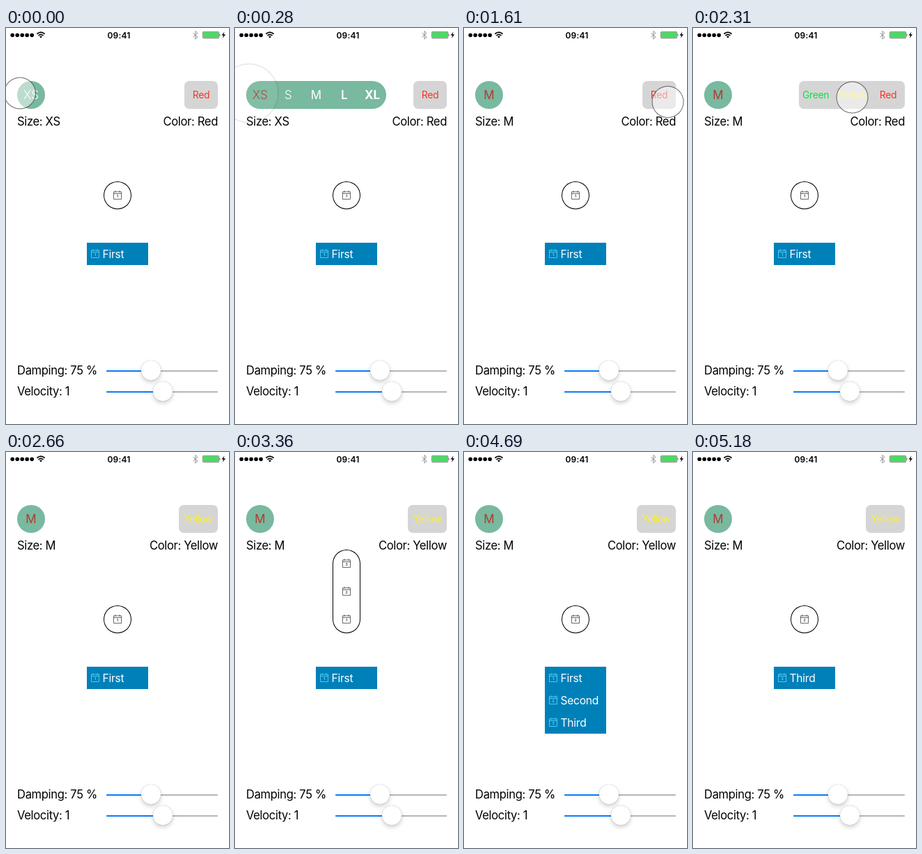
Recreate the animation shown at these times as an HTML page. Size 320 by 568 pixels, loop 5250 ms.

```html
<!DOCTYPE html>
<html lang="en">
<head>
<meta charset="utf-8">
<title>Expandable selectors</title>
<style>
html, body { margin: 0; width: 100%; height: 100%; overflow: hidden; background: #fff; }
body { position: relative; font-family: Inter, Roboto, sans-serif; color: #000; }
body > * { position: absolute; }
.label { font-size: 16.6px; letter-spacing: -.35px; line-height: 20px; white-space: pre; }
#clock { left: 112px; width: 100px; top: 0; text-align: center; font-size: 12px; font-weight: 600; line-height: 21px; letter-spacing: .2px; }
#status { left: 0; top: 0; }
.track { left: 144px; width: 160px; height: 2px; border-radius: 1px; }
.thumb { width: 28px; height: 28px; border-radius: 50%; background: #fff; box-shadow: 0 3px 6px rgba(0,0,0,.2), 0 0 1px rgba(0,0,0,.3); }
.menu { overflow: hidden; }
.cell { position: absolute; left: 0; top: 0; display: flex; align-items: center; justify-content: center; white-space: nowrap; }
.cell svg { display: block; }
#size { background: #78b99f; border-radius: 20px; font-size: 17px; }
#color { background: #d5d5d5; border-radius: 7px; font-size: 13.8px; letter-spacing: -.25px; }
#day { background: #fff; border-radius: 20px; box-shadow: inset 0 0 0 1px #000; color: #444; }
#rank { background: #0080b9; font-size: 15.6px; letter-spacing: -.25px; color: #fff; }
#rank .cell { justify-content: flex-start; }
#rank svg { margin: 0 3.5px 0 5px; color: #62dcff; }
#touch { left: -23px; top: -23px; width: 46px; height: 46px; box-sizing: border-box; border-radius: 50%; background: rgba(255,255,255,.5); border: 1px solid rgba(0,0,0,.58); }
</style>
</head>
<body>
<svg id="status" width="320" height="21">
  <g id="dots"></g>
  <path d="M44.4 8.5Q50 3.7 55.6 8.5M46.5 10.8Q50 7.9 53.5 10.8" fill="none" stroke="#000" stroke-width="1.7"/>
  <path d="M48 12.3Q50 10.8 52 12.3L50 14.5Z"/>
  <path d="M268.4 7.2L275 13L271.8 16V4.4L275 7.4L268.4 13.2" fill="none" stroke="#929292"/>
  <rect x="282.25" y="5.25" width="23.5" height="9.5" rx="1.8" fill="#fff" stroke="#333" stroke-width=".6"/>
  <rect x="283" y="6" width="22" height="8" rx="1" fill="#4cd964"/>
  <path d="M306.6 8.2Q308.4 10 306.6 11.8Z"/>
  <path d="M313.4 5.4L309.4 10.6H311.9L310.8 14.6L315 9.2H312.3Z"/>
</svg>
<div id="clock">09:41</div>
<div class="label" id="sizeLabel" style="left:16px;top:124px"></div>
<div class="label" id="colorLabel" style="right:16px;top:124px"></div>
<script>
const LOOP = 5250;
const $ = id => document.getElementById(id);

function add(parent, cls, css = '', html = '') {
  const el = document.createElement('div');
  el.className = cls;
  el.style.cssText = css;
  el.innerHTML = html;
  parent.append(el);
  return el;
}

const calendar = n => `<svg width="14" height="14" viewBox="0 0 14 14">
  <path d="M1.5 1.9H12.5V12.5H1.5ZM1.5 4.5H12.5M4 .3V2.9M10 .3V2.9" fill="none" stroke="currentColor" stroke-width=".8"/>
  <text x="7" y="10.4" font-size="5" font-weight="700" text-anchor="middle" letter-spacing="0" fill="currentColor">${n}</text></svg>`;

$('dots').innerHTML = [0, 1, 2, 3, 4]
  .map(i => `<circle cx="${9.2 + i * 7}" cy="10.3" r="2.8"/>`).join('');

function slider(text, y, x) {
  add(document.body, 'label', `left:16px;top:${y - 10}px`, text);
  add(document.body, 'track', `top:${y}px;background:#b6b6b6`);
  add(document.body, 'track', `top:${y}px;width:${x - 144}px;background:#0a7cf5`);
  add(document.body, 'thumb', `left:${x - 14}px;top:${y - 14}px`);
}
slider('Damping: 75 %', 491, 207.5);
slider('Velocity: 1', 521, 224.5);

// Cells hold their expanded place; home gives the collapsed place.
const menus = [
  {
    id: 'size', open: 50, close: 1060, from: 0, to: 2,
    cells: ['XS', 'S', 'M', 'L', 'XL'].map((html, i) => ({
      html, x: 16 + 40 * i, y: 76, w: 40, h: 40, weight: [300, 300, 400, 600, 700][i]
    })),
    home: () => [16, 76]
  },
  {
    id: 'color', open: 1700, close: 2365, from: 2, to: 1,
    cells: [['Green', 152, 48, '#00e640'], ['Yellow', 200, 56, '#fff21c'], ['Red', 256, 48, '#fa3323']]
      .map(([html, x, w, color]) => ({ html, x, y: 76, w, h: 40, color })),
    home: c => [304 - c.w, 76]
  },
  {
    id: 'day', open: 3065, close: 3625, from: 0, to: 1,
    cells: [1, 2, 3].map((n, i) => ({ html: calendar(n), x: 140, y: 220 - 40 * i, w: 40, h: 40 })),
    home: () => [140, 220]
  },
  {
    id: 'rank', open: 4370, close: 4870, from: 0, to: 2,
    cells: ['First', 'Second', 'Third'].map((name, i) => ({
      html: calendar(i + 1) + `<span>${name}</span>`, x: 116, y: 308 + 32 * i, w: 88, h: 32
    })),
    home: () => [116, 308]
  }
];

for (const m of menus) {
  m.el = add(document.body, 'menu');
  m.el.id = m.id;
  for (const c of m.cells) {
    c.el = add(m.el, 'cell', `width:${c.w}px;height:${c.h}px;font-weight:${c.weight || 400}`, c.html);
    if (c.color) c.el.style.color = c.color;
  }
  const low = k => Math.min(...m.cells.map(c => c[k]));
  const high = (k, s) => Math.max(...m.cells.map(c => c[k] + c[s]));
  m.full = [low('x'), low('y'), high('x', 'w') - low('x'), high('y', 'h') - low('y')];
}

// x, y, time down, time up
const touches = [
  [20, 93.5, 0, 50],
  [127.5, 90.5, 980, 1060],
  [292.5, 106, 1540, 1700],
  [228.5, 99.5, 2310, 2365],
  [167, 242, 3010, 3065],
  [167, 201, 3570, 3625],
  [172.5, 324.5, 4200, 4370],
  [176, 388, 4760, 4870]
];
const touch = add(document.body, '');
touch.id = 'touch';

const lerp = (a, b, p) => a + (b - a) * p;
const smooth = p => p * p * (3 - 2 * p);

// Damping ratio 0.75, initial velocity 1
function spring(ms) {
  const t = ms / 1000, decay = 22.5, freq = 19.84;
  if (t <= 0) return 0;
  if (t > .3) return 1;
  return 1 - Math.exp(-decay * t) * (Math.cos(freq * t) + (decay - 1) / freq * Math.sin(freq * t));
}

function drawMenu(m, t) {
  const p = t < m.close ? spring(t - m.open) : 1 - spring(t - m.close);
  const sel = t < m.close ? m.from : m.to;
  const s = m.cells[sel];
  const small = [...m.home(s), s.w, s.h];
  const [x, y, w, h] = small.map((v, i) => lerp(v, m.full[i], p));
  m.el.style.cssText = `left:${x}px;top:${y}px;width:${w}px;height:${h}px`;
  m.cells.forEach((c, i) => {
    const [hx, hy] = m.home(c);
    c.el.style.transform = `translate(${lerp(hx, c.x, p) - x}px,${lerp(hy, c.y, p) - y}px)`;
    c.el.style.opacity = i === sel ? 1 : Math.max(0, Math.min(1, p));
    if (m.id === 'size') c.el.style.color = i === sel && t >= m.open ? '#b23a32' : '#fff';
  });
}

function drawTouch(t) {
  const hit = touches.find(([, , down, up]) => t >= down && t < up + 300);
  touch.style.opacity = 0;
  if (!hit) return;
  const [x, y, , up] = hit;
  const p = smooth(Math.max(0, (t - up) / 300));
  touch.style.opacity = 1 - p;
  touch.style.transform = `translate(${x}px,${y}px) scale(${1 + p})`;
}

const start = performance.now();
function frame() {
  const t = Math.max(0, performance.now() - start) % LOOP;
  menus.forEach(m => drawMenu(m, t));
  $('sizeLabel').textContent = 'Size: ' + (t < menus[0].close ? 'XS' : 'M');
  $('colorLabel').textContent = 'Color: ' + (t < menus[1].close ? 'Red' : 'Yellow');
  drawTouch(t);
  requestAnimationFrame(frame);
}
frame();
</script>
</body>
</html>
```
